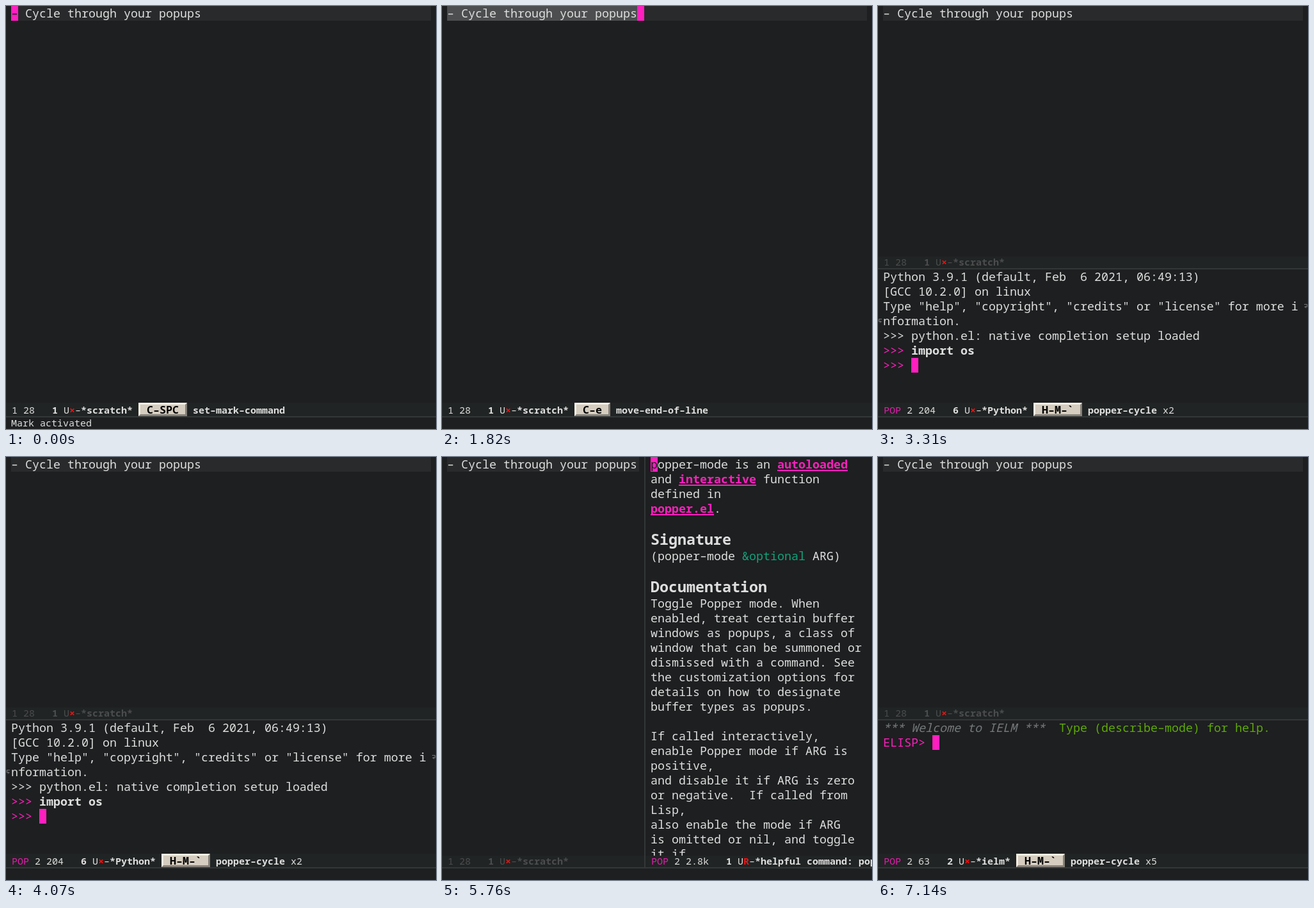
Recreate the animation shown at these times as an HTML page with a canvas. Size 672 by 660 pixels, loop 8000 ms.

```html
<!DOCTYPE html>
<html lang="en">
<head>
<meta charset="utf-8">
<title>Popup cycling</title>
<style>
html, body { margin: 0; width: 100%; height: 100%; overflow: hidden; background: #1d1f20; }
canvas { display: block; }
</style>
</head>
<body>
<canvas id="stage" width="672" height="660"></canvas>
<script>
const ctx = document.getElementById("stage").getContext("2d");
const WIDTH = 672, HEIGHT = 660, LOOP = 8000;
const ROW = 23, CELL = 11, SMALL = 9, KEY = 10, HEADING = 14;

const BG = "#1d1f20", BAR = "#212424", LINE = "#343738", HIGHLIGHT = "#282a2b", REGION = "#4c4e4f";
const FG = "#dedede", DIM = "#4b4d4e", PINK = "#ff1fbf", POP = "#e01eab", RED = "#f81010";
const GREY = "#76797b", GREEN = "#5fa808", TEAL = "#11a37a";

function rect(x, y, w, h, color) {
  ctx.fillStyle = color;
  ctx.fillRect(x, y, w, h);
}

// Advance is 0.6 em, so the cell width fixes the font size. Returns the end x.
function text(str, x, baseline, { color = FG, style = "", cell = CELL, underline = false } = {}) {
  ctx.font = `${style} ${cell / 0.6}px "Noto Sans Mono", "DejaVu Sans Mono", monospace`;
  ctx.fillStyle = color;
  ctx.fillText(str.replaceAll("-", "–"), x, baseline);
  const width = str.length * cell;
  if (underline) rect(x, baseline + 2, width, 2, color);
  return x + width;
}

// Each part is a string or [string, options].
function spans(parts, x, baseline, defaults) {
  for (const part of parts) {
    const [str, options] = Array.isArray(part) ? part : [part];
    x = text(str, x, baseline, { ...defaults, ...options });
  }
  return x;
}

function rows(lines, x, top) {
  for (const line of lines) {
    if (line.heading) {
      text(line.heading, x, top + 22, { style: "bold", cell: HEADING });
      top += 28;
    } else {
      spans([].concat(line.parts ?? [line]), x, top + 18);
      top += ROW;
    }
  }
}

function cursor(x, y) {
  rect(x, y, CELL, ROW, PINK);
}

function wrapMark(y, onRight) {
  ctx.save();
  ctx.translate(onRight ? 665 : 7, y);
  ctx.scale(onRight ? 1 : -1, 1);
  ctx.strokeStyle = "#747678";
  ctx.lineWidth = 1;
  ctx.stroke(new Path2D("M1 8.5H5.5V12.5H2M4 10.5L2 12.5L4 14.5"));
  ctx.restore();
}

function keyBox(label, x) {
  const w = (label.length + 2) * KEY + 6, y = 619, h = 21;
  rect(x, y, w, h, "#f3eee3");
  ctx.fillStyle = "#85817a";
  ctx.fill(new Path2D(`M${x + w} ${y}v${h}h${-w}l3 -3h${w - 6}v${6 - h}z`));
  rect(x + 3, y + 3, w - 6, h - 6, "#d5cdbf");
  text(label, x + 3 + KEY, 636, { color: "#000", style: "bold", cell: KEY });
  return x + w;
}

// bar: { popup, position, lineNo, flag, name, key, command, count, dim }
function modeline(bar, { x = 0, width = WIDTH, bottom = 640 } = {}) {
  const color = bar.dim ? DIM : FG, baseline = bottom - 4;
  const top = bottom - (bar.key ? 21 : 18);
  const bold = { style: "bold" }, look = { color, cell: SMALL };
  ctx.save();
  ctx.beginPath();
  ctx.rect(x, top, width, bottom + 2 - top);
  ctx.clip();
  rect(x, top, width, bottom - top, BAR);
  rect(x, bottom, width, 2, LINE);
  let end = spans([
    " ", [bar.popup ? "POP " : "", { color: POP }], bar.position,
    [bar.lineNo, bold], " U", [bar.flag ?? "×", { color: RED, style: "bold" }],
    "-", [bar.name, bold]
  ], x, baseline, look);
  if (bar.key) {
    end = keyBox(bar.key, end + SMALL);
    spans([[bar.command, bold], bar.count ? " " + bar.count : ""], end + SMALL, baseline, look);
  }
  ctx.restore();
}

const scratchBar = { position: "1 28   ", lineNo: "1", name: "*scratch*" };
const dimScratchBar = { ...scratchBar, dim: true };
const cycleKey = { popup: true, key: "H-M-`", command: "popper-cycle" };

function scratch({ width = 656, region = false, point = null } = {}) {
  rect(8, 0, width, ROW, HIGHLIGHT);
  if (region) rect(8, 0, 27 * CELL, ROW, REGION);
  if (point !== null) cursor(8 + point * CELL, 0);
  text("-", 8, 18, { color: point === 0 ? BG : FG });
  text("Cycle through your popups", 30, 18);
}

function markScene() {
  scratch({ point: 0 });
  modeline({ ...scratchBar, key: "C-SPC", command: "set-mark-command" });
  text("Mark activated", 8, 656, { cell: SMALL });
}

function lineEndScene() {
  scratch({ region: true, point: 27 });
  modeline({ ...scratchBar, key: "C-e", command: "move-end-of-line" });
}

function ielmScene(count) {
  scratch();
  modeline(dimScratchBar, { bottom: 409 });
  rows([
    { parts: [["*** Welcome to IELM ***", { color: GREY, style: "italic" }],
              ["  Type (describe-mode) for help.", { color: GREEN }]] },
    { parts: [["ELISP>", { color: PINK }]] }
  ], 8, 411);
  cursor(85, 434);
  modeline({ ...cycleKey, position: "2 63   ", lineNo: "2", name: "*ielm*", count });
}

function pythonScene() {
  const prompt = [">>> ", { color: PINK }];
  scratch();
  modeline(dimScratchBar, { bottom: 409 });
  rows([
    "Python 3.9.1 (default, Feb  6 2021, 06:49:13)",
    "[GCC 10.2.0] on linux",
    'Type "help", "copyright", "credits" or "license" for more i',
    "nformation.",
    ">>> python.el: native completion setup loaded",
    { parts: [prompt, ["import os", { style: "bold" }]] },
    { parts: [prompt] }
  ], 8, 411);
  wrapMark(457, true);
  wrapMark(480, false);
  cursor(52, 549);
  modeline({ ...cycleKey, position: "2 204   ", lineNo: "6", name: "*Python*", count: "x2" });
}

function messagesScene() {
  const resume = "to stop, M-x gif-screencast-toggle-pause to resume.)";
  scratch({ region: true, point: 27 });
  modeline(scratchBar, { bottom: 479 });
  rows([
    resume,
    "Start recording GIF in 1... (Press M-x gif-screencast-stop",
    resume,
    "My/Screencast mode enabled",
    "Mark activated"
  ], 8, 481);
  wrapMark(481, false);
  wrapMark(504, true);
  wrapMark(527, false);
  modeline({ ...cycleKey, position: "2 8.8k ", lineNo: "166", flag: "R",
             name: "*Messages*", count: "x3", dim: true });
}

function helpScene() {
  const link = { color: PINK, style: "bold", underline: true };
  scratch({ width: 300 });
  cursor(326, 0);
  rows([
    { parts: [["p", { color: BG }], "opper-mode is an ", ["autoloaded", link]] },
    { parts: ["and ", ["interactive", link], " function"] },
    "defined in",
    { parts: [["popper.el", link], "."] },
    "",
    { heading: "Signature" },
    { parts: ["(popper-mode ", ["&optional", { color: TEAL }], " ARG)"] },
    "",
    { heading: "Documentation" },
    "Toggle Popper mode. When",
    "enabled, treat certain buffer",
    "windows as popups, a class of",
    "window that can be summoned or",
    "dismissed with a command. See",
    "the customization options for",
    "details on how to designate",
    "buffer types as popups.",
    "",
    "If called interactively,",
    "enable Popper mode if ARG is",
    "positive,",
    "and disable it if ARG is zero",
    "or negative.  If called from",
    "Lisp,",
    "also enable the mode if ARG",
    "is omitted or nil, and toggle",
    "it if"
  ], 326, 0);
  modeline(dimScratchBar, { width: 316 });
  modeline({ popup: true, position: "2 2.8k   ", lineNo: "1", flag: "R",
             name: "*helpful command: popper-mode*" }, { x: 318, width: 354 });
  rect(316, 0, 2, 642, LINE);
}

const scenes = [
  [0, markScene],
  [1000, lineEndScene],
  [2370, () => ielmScene()],
  [3310, pythonScene],
  [4580, messagesScene],
  [5760, helpScene],
  [7140, () => ielmScene("x5")]
];

function render() {
  const time = performance.now() % LOOP;
  rect(0, 0, WIDTH, HEIGHT, BG);
  scenes.findLast(([start]) => time >= start)[1]();
  requestAnimationFrame(render);
}
render();
</script>
</body>
</html>
```
